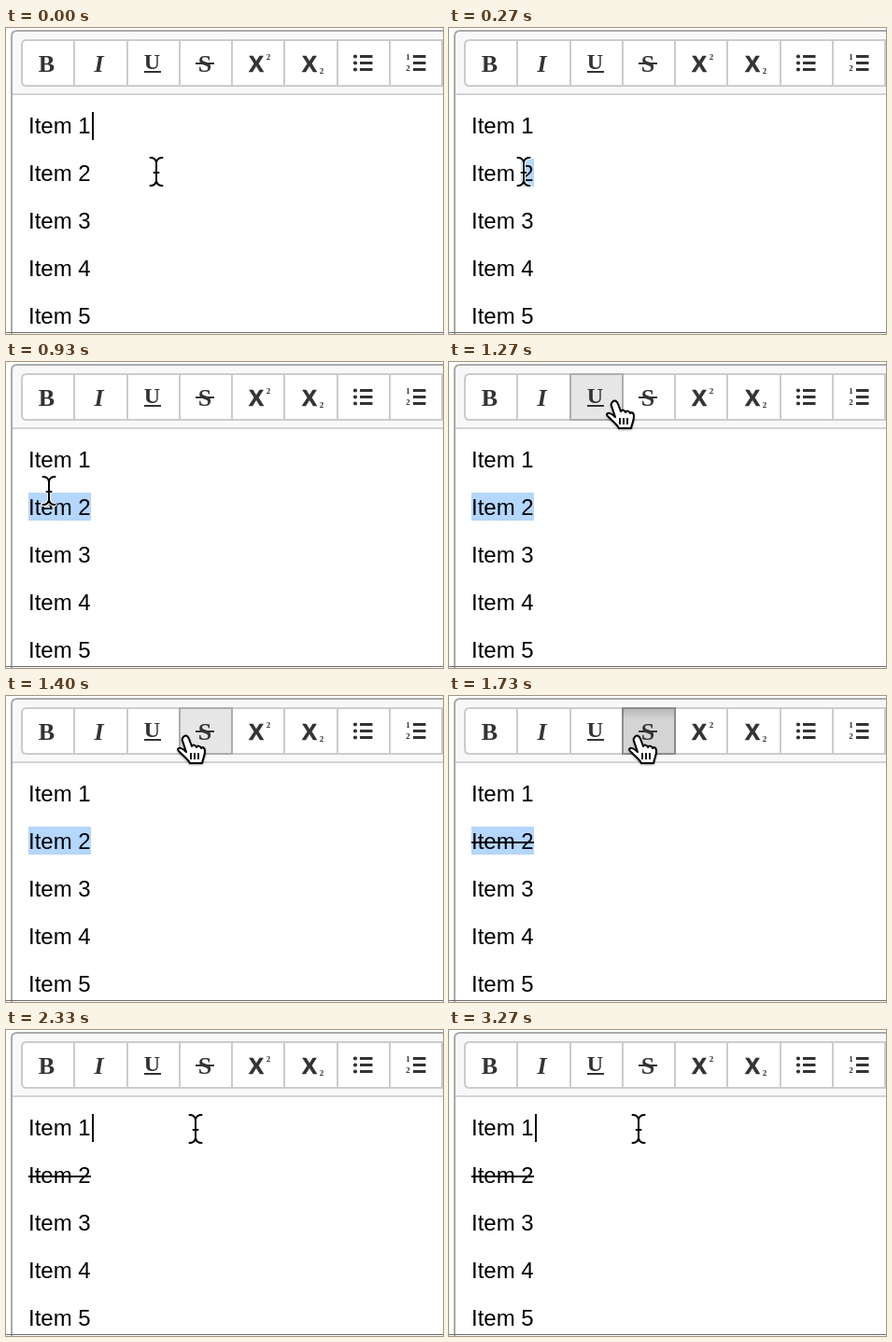
Animation, 468 px wide and 328 px high, one loop 3.39 s. Source, as an HTML page:

```html
<!DOCTYPE html>
<html lang="en">
<head>
<meta charset="utf-8">
<title>Rich text editor</title>
<style>
html, body { margin: 0; width: 100%; height: 100%; overflow: hidden; background: #fff; }
svg { display: block; width: 468px; height: 328px; }
text { white-space: pre; }
.item { font: 24px "Liberation Sans", Arial, sans-serif; fill: #000; }
.serif { font: bold 26px "Liberation Serif", "Times New Roman", serif; fill: #333; text-anchor: middle; }
.sans { font: bold 24px "Liberation Sans", Arial, sans-serif; fill: #333; stroke: #333; stroke-width: .6; text-anchor: middle; }
.tiny { font: bold 9px "Liberation Serif", "Times New Roman", serif; fill: #333; text-anchor: middle; }
.bar { fill: #333; }
.btn { fill: #fff; stroke: #ccc; stroke-width: 2; }
.hover, .on { fill: #e6e6e6; stroke: #adadad; }
.press { fill: #d4d4d4; stroke: #8c8c8c; }
</style>
</head>
<body>
<svg viewBox="0 0 468 328" xmlns="http://www.w3.org/2000/svg">
  <defs>
    <linearGradient id="inset" x1="0" y1="0" x2="0" y2="1">
      <stop offset="0" stop-opacity=".13"/>
      <stop offset="1" stop-opacity="0"/>
    </linearGradient>
    <filter id="shade" x="-30%" y="-30%" width="160%" height="160%">
      <feDropShadow dx="0" dy="1" stdDeviation="1" flood-opacity=".35"/>
    </filter>
  </defs>
  <rect width="468" height="328" fill="#fff"/>
  <path d="M6 71V9Q6 3 12 3H468V71Z" fill="#f8f8f8"/>
  <rect x="6" y="70" width="462" height="2" fill="#d4d4d4"/>
  <path d="M6 328V9Q6 3 12 3H470" fill="none" stroke="#aaa" stroke-width="2"/>

  <g id="buttons"></g>
  <rect id="inner" x="186" y="14" width="55" height="11" fill="url(#inset)"/>

  <g id="icons">
    <text class="serif" x="43.5" y="47">B</text>
    <text class="serif" x="99.5" y="47" font-style="italic" style="font-style:italic">I</text>
    <text class="serif" x="156.5" y="44" style="font-size:24px">U</text>
    <rect class="bar" x="148" y="46" width="18" height="2"/>
    <text class="serif" x="213" y="47">S</text>
    <rect class="bar" x="203" y="37" width="20" height="2"/>
    <text class="sans" x="268" y="47">X</text>
    <text class="tiny" x="281" y="34">2</text>
    <text class="sans" x="325" y="47">X</text>
    <text class="tiny" x="338" y="49">2</text>
    <text class="tiny" x="430.5" y="34">1</text>
    <text class="tiny" x="430.5" y="46">2</text>
  </g>

  <rect id="mark" y="140" height="30" fill="#b3d7ff"/>
  <g id="items"></g>
  <rect id="strike" x="24" y="156" width="67" height="2"/>
  <rect id="caret" x="92" y="90" width="2" height="30"/>
  <rect y="326" width="468" height="1" fill="#6c6c6c"/>

  <g id="beam" fill="none" stroke-linecap="round">
    <path id="beamShape" stroke="#fff" stroke-width="4"
      d="M-6.5 -15Q-1 -15 0 -10Q1 -15 6.5 -15M0 -10V10M-6.5 15Q-1 15 0 10Q1 15 6.5 15M-2.5 1H2.5"/>
    <use href="#beamShape" id="beamInk"/>
  </g>
  <g id="hand" filter="url(#shade)">
    <path fill="#fff" stroke="#000" stroke-width="2" stroke-linejoin="round"
      d="M7 3C9 0 12 2 13 5L16 13C17 11 20 11 21 14C22 12 25 12 26 15C28 13 30 15 30 18C30 23 28 26 27 31H14C12 27 8 24 5 21C3 19 1 18 1 16C2 14 5 14 10 19L6 7C5 5 6 4 7 3Z"/>
    <path d="M15 20V27M19 20V27M23 20V27" stroke="#000" stroke-width="1.8"/>
  </g>
</svg>
<script>
const $ = id => document.getElementById(id);
const LOOP = 3390, PITCH = 56.25, TEXT_END = 91;

function add(parent, tag, attrs, text = "") {
  const el = document.createElementNS("http://www.w3.org/2000/svg", tag);
  for (const k in attrs) el.setAttribute(k, attrs[k]);
  el.textContent = text;
  return parent.appendChild(el);
}

// Toolbar buttons share their borders; the first one is rounded on the left.
const buttons = Array.from({ length: 8 }, (_, i) => {
  const l = Math.round(17 + i * PITCH), r = Math.round(17 + (i + 1) * PITCH);
  const d = i ? `M${l} 13H${r}V62H${l}Z` : `M${r} 13H22Q17 13 17 18V57Q17 62 22 62H${r}Z`;
  return add($("buttons"), "path", { d, class: "btn" });
});

for (const y of [31, 38, 45]) {
  add($("icons"), "circle", { cx: 374, cy: y - .5, r: 2.1, class: "bar" });
  for (const x of [379, 436])
    add($("icons"), "rect", { x, y: y - 2, width: 13.5, height: 3, class: "bar" });
}
for (let i = 0; i < 5; i++)
  add($("items"), "text", { x: 24, y: 113 + 51 * i, class: "item" }, "Item " + (i + 1));

const ink = $("beamShape").cloneNode();
ink.removeAttribute("id");
ink.setAttribute("stroke", "#000");
ink.setAttribute("stroke-width", "2");
$("beamInk").replaceWith(ink);

// [time, pointer, x, y]
const moves = [
  [0, "beam", 161, 154], [70, "beam", 157, 154], [130, "beam", 138, 154],
  [200, "beam", 106, 154], [270, "beam", 80, 154], [330, "beam", 61, 153],
  [400, "beam", 43, 153], [470, "beam", 27, 152], [530, "beam", 15, 152],
  [600, "beam", 7, 152], [800, "beam", 14, 151], [870, "beam", 28, 147],
  [930, "beam", 46, 138], [1000, "beam", 69, 121], [1070, "beam", 101, 97],
  [1130, "beam", 135, 76], [1200, "hand", 153, 46], [1270, "hand", 168, 40],
  [1330, "hand", 174, 40], [1400, "hand", 183, 41], [1470, "hand", 190, 41],
  [1530, "hand", 192, 41], [1930, "hand", 192, 45], [2000, "beam", 202, 82],
  [2070, "beam", 203, 99], [2130, "beam", 203, 106]
];
// [time, value]
const carets = [[0, 1], [200, 0], [2330, 1], [2730, 0], [3270, 1]];
const marks = [[0, TEXT_END], [270, 77], [330, 71], [400, 51], [600, 24], [2270, TEXT_END]];
const underline = [[0, ""], [1200, "hover"], [1400, ""]];
const through = [[0, ""], [1400, "hover"], [1530, "press"], [2000, "on"], [2330, ""]];
const strikes = [[0, 0], [1670, 1]];

const at = (steps, t) => steps.findLast(s => s[0] <= t);
const show = (el, on) => { el.style.display = on ? "" : "none"; };

function draw(t) {
  const [, kind, x, y] = at(moves, t);
  for (const id of ["beam", "hand"]) show($(id), id === kind);
  $(kind).setAttribute("transform", `translate(${x} ${y})`);

  const from = at(marks, t)[1];
  $("mark").setAttribute("x", from);
  $("mark").setAttribute("width", TEXT_END - from);
  show($("caret"), at(carets, t)[1]);
  show($("strike"), at(strikes, t)[1]);

  const u = at(underline, t)[1], s = at(through, t)[1];
  buttons[2].setAttribute("class", "btn " + u);
  buttons[3].setAttribute("class", "btn " + s);
  show($("inner"), s === "press" || s === "on");
  // The highlighted button's borders lie on top of its neighbours.
  const top = s ? buttons[3] : u ? buttons[2] : null;
  if (top && top !== $("buttons").lastChild) $("buttons").append(top);
}

const start = performance.now();
function tick(now) {
  draw(Math.max(0, now - start) % LOOP);
  requestAnimationFrame(tick);
}
draw(0);
requestAnimationFrame(tick);
</script>
</body>
</html>
```
